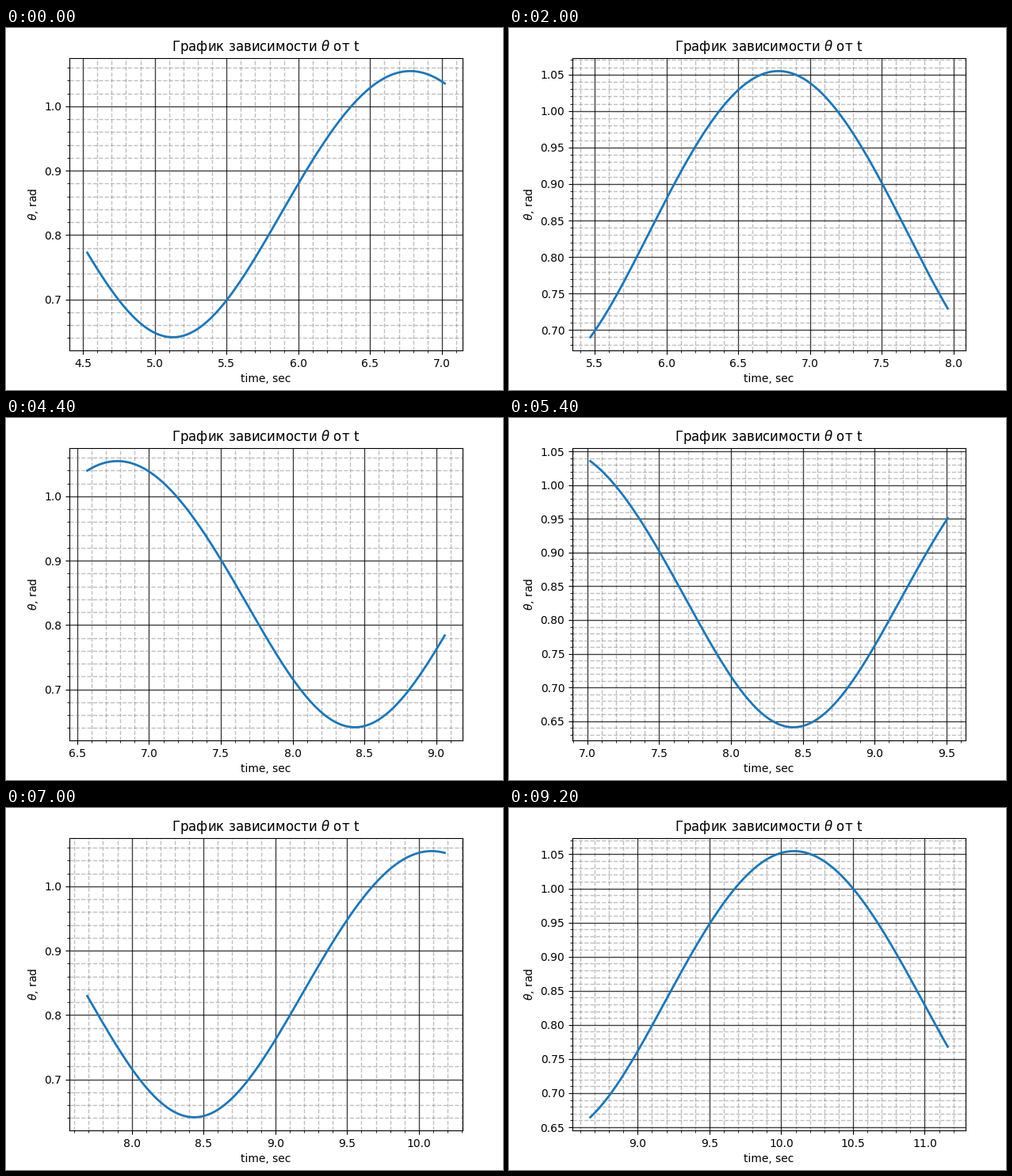
Animation of 627x457 px, one loop 9300 ms. Source, as a matplotlib script:

```python
import numpy as np
import matplotlib.pyplot as plt
from matplotlib.animation import FuncAnimation

W, H, DPI = 627, 457, 100
FRAMES, INTERVAL = 93, 100

# Oscillation of the angle
PEAK_TIME, PERIOD = 6.78, 3.309
LOW, HIGH = 0.64105, 1.0547

# The window slides at a slightly uneven pace between these key frames
KEY_FRAMES = [0, 20, 31, 51, 62, 70, 92]
KEY_STARTS = [4.53, 5.47, 5.95, 6.90, 7.35, 7.69, 8.67]
SAMPLES = np.arange(250) * 0.01


def theta(t):
    """Cosine with weak overtones that vanish at its extremes."""
    phase = 2 * np.pi * (t - PEAK_TIME) / PERIOD
    c = np.cos(phase)
    overtones = (1 - c ** 2) * (0.0136 - 0.0044 * c)
    return (HIGH + LOW) / 2 + (HIGH - LOW) / 2 * c + overtones


def window(frame):
    start = np.interp(frame, KEY_FRAMES, KEY_STARTS)
    return np.round(start, 2) + SAMPLES


plt.rcParams["font.family"] = "DejaVu Sans"
# The tiny surplus keeps the canvas from being truncated by a pixel
fig = plt.figure(figsize=((W + 1e-6) / DPI, (H + 1e-6) / DPI), dpi=DPI,
                 facecolor="white")
ax = fig.add_axes([80 / W, 49.8 / H, 496 / W, 369.6 / H])
ax.set_title(r"График зависимости $\theta$ от t")
ax.set_xlabel("time, sec")
ax.set_ylabel(r"$\theta$, rad")
ax.minorticks_on()
ax.grid(which="major", color="black", linewidth=1, alpha=0.75)
ax.grid(which="minor", color="gray", linewidth=1, linestyle="--", alpha=0.5)
line, = ax.plot([], [], color="#1f77b4", linewidth=2)


def update(frame):
    t = window(frame)
    line.set_data(t, theta(t))
    ax.relim()
    ax.autoscale_view()
    return line,


anim = FuncAnimation(fig, update, frames=FRAMES, interval=INTERVAL,
                     init_func=lambda: update(0), repeat=True,
                     repeat_delay=0, blit=False)
plt.show()
```
